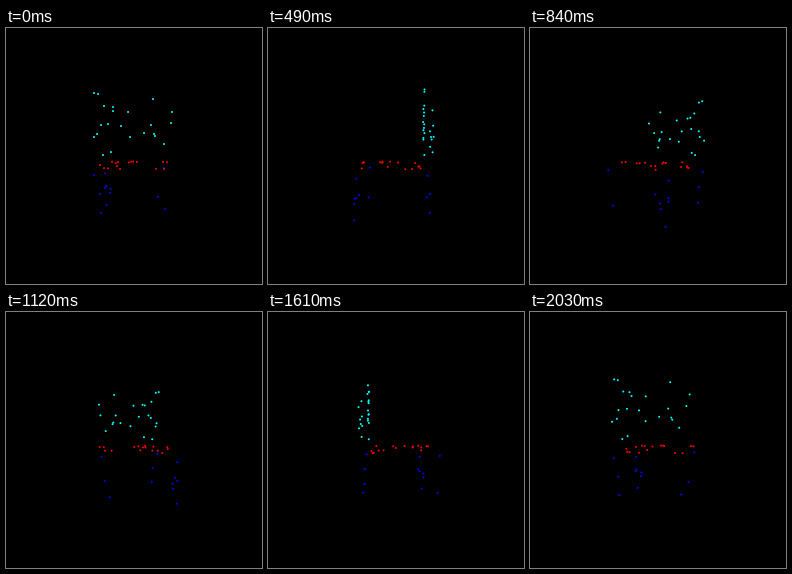
Animation, 256 px wide and 256 px high, one loop 2100 ms. Source, as a matplotlib script:

```python
import math

import numpy as np
import matplotlib.pyplot as plt
from matplotlib.animation import FuncAnimation

SIZE, DPI = 256, 64
FRAMES, INTERVAL = 30, 70
DIST = 2.0
FOCAL = SIZE / 2 / math.tan(math.radians(30))
DOT = 2.0  # diameter in pixels


def panel(z, xy):
    """Points of the backrest: (x, y) pairs in an upright plane."""
    return [(x, y, z) for x, y in xy]


def slab(y, xz):
    """Points of the seat: (x, z) pairs in a level plane."""
    return [(x, y, z) for x, z in xz]


# y points down, z points away from the viewer
back = panel(-0.248, [
    (-.316, -.498), (-.284, -.490), (.150, -.450), (-.237, -.395),
    (-.166, -.355), (-.047, -.348), (.300, -.348), (-.205, -.253),
    (-.103, -.237), (.134, -.245), (.158, -.174), (.166, -.158),
    (-.292, -.174), (-.245, -.008),
]) + panel(-0.316, [
    (-.160, -.372), (-.250, -.235), (.281, -.250), (-.304, -.144),
    (-.030, -.144), (.076, -.175), (.228, -.091), (-.175, -.030),
])

seat = slab(0.058, [
    (.284, .170), (.312, .095), (.029, .150), (-.223, .250), (-.152, .100),
    (-.046, -.022), (-.150, -.175), (-.030, .288), (-.008, .297),
]) + slab(0.104, [
    (-.257, -.100), (-.217, -.150), (-.112, -.220),
    (.180, -.200), (.243, -.210), (-.174, .270),
]) + [(-.311, .083, .030)]

legs = [
    (-.312, .148, -.270), (-.262, .293, -.290), (-.254, .440, -.290),
    (.239, .412, -.282),
    (.310, .124, .310), (.250, .425, .310),
    (-.298, .178, .280), (-.285, .307, .262), (-.298, .329, .280),
    (-.245, .344, .310), (-.250, .385, .310), (-.285, .508, .300),
]

points = np.array(legs + seat + back)
colors = ["#0000ff"] * len(legs) + ["#ff0000"] * len(seat) + ["#00ffff"] * len(back)


def project(angle):
    """Turn the chair about its upright axis and view it in perspective."""
    x, y, z = points.T
    c, s = math.cos(angle), math.sin(angle)
    scale = FOCAL / (DIST + x * s + z * c)
    return np.column_stack([(x * c - z * s) * scale, y * scale]) + SIZE / 2


fig = plt.figure(figsize=(SIZE / DPI, SIZE / DPI), dpi=DPI, facecolor="black")
ax = fig.add_axes([0, 0, 1, 1])
ax.set_xlim(0, SIZE)
ax.set_ylim(SIZE, 0)
ax.axis("off")

start = project(0)
dots = ax.scatter(start[:, 0], start[:, 1], s=(DOT * 72 / DPI) ** 2,
                  c=colors, marker="o", linewidths=0)


def update(i):
    dots.set_offsets(project(2 * math.pi * i / FRAMES))
    return (dots,)


anim = FuncAnimation(fig, update, frames=FRAMES, interval=INTERVAL,
                     repeat=True, repeat_delay=0, blit=False)
plt.show()
```
